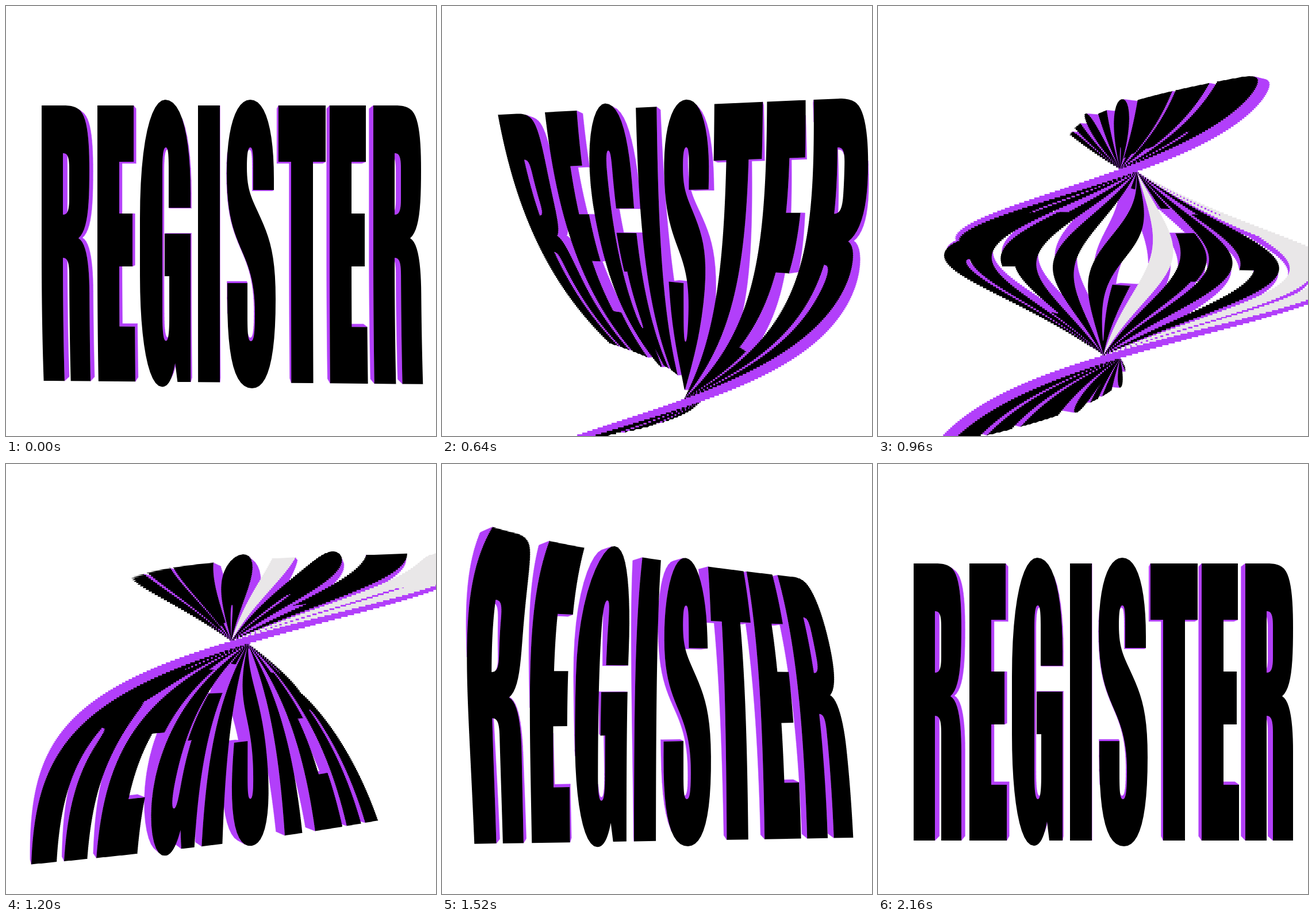
Write an HTML page with a canvas that moves like this. It is 748 px wide and 748 px high and loops after 3040 ms.

```html
<!DOCTYPE html>
<html lang="en">
<head>
<meta charset="utf-8">
<title>Register</title>
<style>
  html, body { margin: 0; width: 100%; height: 100%; overflow: hidden; background: #fff; }
  canvas { display: block; width: 748px; height: 748px; }
</style>
</head>
<body>
<canvas id="stage" width="748" height="748" role="img" aria-label="REGISTER"></canvas>
<script>
const ctx = document.getElementById('stage').getContext('2d');
const SIZE = 748, MID = SIZE / 2;
const AXIS = 421, CAMERA = 1012, DEPTH = 29;
const BANDS = 256, LAG = 0.8;
const LOOP = 3040, STEP = 80, LAST = 2160;
const TURN_START = 344, TURN_TIME = 1937, EASE = 0.795;
const INK = '#000', SIDE = '#b23ffa', PALE = '#e9e7e8';

// Outer contours run clockwise, holes run the other way.
const SHAPES = {
  R: 'M62 173H101C112 173 123 175 130 183C142 197 145 236 145 285C145 350 142 390 126 404' +
     'C141 412 145 455 145 500V655H110V470C110 448 108 438 99 438V655H62Z' +
     'M99 256V363C107 363 110 356 110 335V285C110 264 108 256 99 256Z',
  E: 'M159 173H222V271H197V361H220V453H197V558H224V655H159Z',
  G: 'M277 163C307 163 321 232 321 325V351H283V285C283 258 282 246 278 246C274 246 272 258 272 285' +
     'V540C272 570 274 583 278 583C282 583 284 570 284 540V470H276V396H321V655H298L294 622' +
     'C289 649 282 664 271 664C246 664 233 580 233 470V370C233 236 252 163 277 163Z',
  I: 'M334 173H372V655H334Z',
  S: 'M425 163C453 163 466 220 466 300V320H430V280C430 256 429 246 425 246C421 246 419 256 419 280' +
     'C419 312 424 327 433 347C455 395 469 420 469 510C469 615 455 665 428 665' +
     'C398 665 385 615 385 510V482H420V540C420 570 421 583 426 583C431 583 433 570 433 535' +
     'C433 485 424 458 412 430C396 393 384 365 384 290C384 215 399 163 425 163Z',
  T: 'M474 173H556V271H534V655H496V271H474Z'
};

// Turns path data into closed polylines, measured from the turning axis.
function flatten(path, shift) {
  const contours = [];
  let pts, x, y;
  const add = (px, py) => {
    x = px; y = py;
    pts.push([x + shift - AXIS, y - MID]);
  };
  for (const [, cmd, args] of path.matchAll(/([MHVLCZ])([^MHVLCZ]*)/g)) {
    const n = args.split(' ').map(Number);
    if (cmd === 'M') { contours.push(pts = []); add(n[0], n[1]); }
    if (cmd === 'L') add(n[0], n[1]);
    if (cmd === 'H') add(n[0], y);
    if (cmd === 'V') add(x, n[0]);
    if (cmd === 'C') {
      const x0 = x, y0 = y;
      for (let i = 1; i <= 12; i++) {
        const s = i / 12;
        add(cubic(x0, n[0], n[2], n[4], s), cubic(y0, n[1], n[3], n[5], s));
      }
    }
  }
  return contours;
}

function cubic(a, b, c, d, s) {
  const r = 1 - s;
  return r * r * r * a + 3 * r * r * s * b + 3 * r * s * s * c + s * s * s * d;
}

function letter(name, shift = 0, back = INK) {
  const contours = flatten(SHAPES[name], shift);
  const xs = contours[0].map(p => p[0]);
  return { contours, back, mid: (Math.min(...xs) + Math.max(...xs)) / 2 };
}

const word = [
  letter('R', 0, PALE), letter('E'), letter('G'), letter('I', 0, PALE),
  letter('S'), letter('T'), letter('E', 404), letter('R', 577)
];

function ease(u) {
  if (u <= 0) return 0;
  if (u >= 1) return 1;
  let lo = 0, hi = 1;
  for (let i = 0; i < 24; i++) {
    const s = (lo + hi) / 2;
    if (cubic(0, EASE, 1 - EASE, 1, s) < u) lo = s; else hi = s;
  }
  return cubic(0, 0, 1, 1, lo);
}

function trace(contours) {
  ctx.beginPath();
  for (const pts of contours) {
    pts.forEach((p, i) => i ? ctx.lineTo(p[0], p[1]) : ctx.moveTo(p[0], p[1]));
    ctx.closePath();
  }
}

function addWalls(front, back, top, bottom) {
  const n = front.length;
  for (let i = 0; i < n; i++) {
    const j = (i + 1) % n;
    const a = front[i], b = front[j], c = back[j], d = back[i];
    if (Math.max(a[1], b[1], c[1], d[1]) < top - 1) continue;
    if (Math.min(a[1], b[1], c[1], d[1]) > bottom + 1) continue;
    const area = (c[0] - a[0]) * (d[1] - b[1]) - (d[0] - b[0]) * (c[1] - a[1]);
    if (area >= 0) continue;
    ctx.moveTo(a[0], a[1]);
    ctx.lineTo(b[0], b[1]);
    ctx.lineTo(c[0], c[1]);
    ctx.lineTo(d[0], d[1]);
    ctx.closePath();
  }
}

function drawBand(top, bottom, angle) {
  const cos = Math.cos(angle), sin = Math.sin(angle), off = AXIS - MID;
  const project = w => ([u, v]) => {
    const scale = CAMERA / (CAMERA - u * sin - w * cos);
    return [MID + (off + u * cos - w * sin) * scale, MID + v * scale];
  };
  const toFront = project(0), toBack = project(-DEPTH);

  // Camera position in the word's own turned frame.
  const camU = CAMERA * sin - off * cos;
  const camW = CAMERA * cos + off * sin;
  const order = [...word].sort((a, b) => Math.abs(b.mid - camU) - Math.abs(a.mid - camU));

  ctx.save();
  ctx.beginPath();
  ctx.rect(0, top, SIZE, bottom - top);
  ctx.clip();
  for (const { contours, back: backInk } of order) {
    const front = contours.map(pts => pts.map(toFront));
    const back = contours.map(pts => pts.map(toBack));
    ctx.beginPath();
    front.forEach((pts, i) => addWalls(pts, back[i], top, bottom));
    ctx.fillStyle = ctx.strokeStyle = SIDE;
    ctx.lineWidth = 0.5;
    ctx.fill();
    ctx.stroke();
    if (camW > 0) {
      trace(front);
      ctx.fillStyle = INK;
      ctx.fill();
    } else if (camW < -DEPTH) {
      trace(back);
      ctx.fillStyle = backInk;
      ctx.fill();
    }
  }
  ctx.restore();
}

// Lower rows run ahead in time, which twists the rigid turn.
function draw(time) {
  ctx.fillStyle = '#fff';
  ctx.fillRect(0, 0, SIZE, SIZE);
  for (let i = 0; i < BANDS; i++) {
    const top = Math.round(i * SIZE / BANDS);
    const bottom = Math.round((i + 1) * SIZE / BANDS);
    const local = time + LAG * (top + bottom) / 2;
    drawBand(top, bottom, 2 * Math.PI * ease((local - TURN_START) / TURN_TIME));
  }
}

const start = performance.now();
let shown = -1;

function tick() {
  const time = (performance.now() - start) % LOOP;
  const step = Math.min(Math.floor(time / STEP) * STEP, LAST);
  if (step !== shown) draw(shown = step);
  requestAnimationFrame(tick);
}
tick();
</script>
</body>
</html>
```
